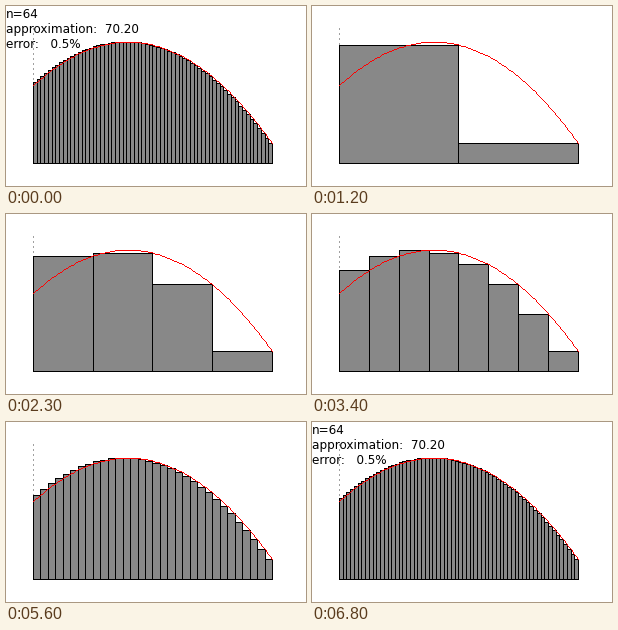
Recreate the animation shown at these times as a matplotlib script. Size 300x180 px, loop 7790 ms.

```python
import numpy as np
import matplotlib.pyplot as plt
from matplotlib.animation import FuncAnimation

W, H, DPI = 300, 180, 100
STEP, LOOP = 10, 7790             # ms
BLANK, CYCLE = 100, 1100          # ms without labels, ms per bar count
COUNTS = [2 ** k for k in range(7)]

LEFT, BASE, TOP = 27, 157, 22     # pixel positions of the plot area
SX, SY = 23.9, 13.49              # pixels per unit
SPAN = 10
A, B, C = -0.2069, 1.6402, 5.75

WHITE, BLACK, RED = (255, 255, 255), (0, 0, 0), (255, 0, 0)
BAR, AXIS = (136, 136, 136), (160, 160, 160)


def f(x):
    return A * x ** 2 + B * x + C


def px(x):
    return LEFT + int(np.ceil(x * SX - 0.5))


def py(y):
    return BASE - int(np.floor(y * SY + 0.5))


def line(img, x0, y0, x1, y1, color):
    steps = max(abs(x1 - x0), abs(y1 - y0), 1)
    t = np.arange(steps + 1) / steps
    xs = np.floor(x0 + (x1 - x0) * t + 0.5).astype(int)
    ys = np.floor(y0 + (y1 - y0) * t + 0.5).astype(int)
    img[ys, xs] = color


def bar(img, x0, x1, top):
    img[top:BASE + 1, x0:x1 + 1] = BLACK
    img[top + 1:BASE, x0 + 1:x1] = BAR


def plot(n):
    img = np.full((H, W, 3), WHITE, dtype=np.uint8)
    for y in range(TOP, BASE, 5):
        img[y:y + 2, LEFT] = AXIS
    edges = np.linspace(0, SPAN, n + 1)
    for a, b in zip(edges, edges[1:]):
        bar(img, px(a), px(b), py(f(b)))
    pts = [(px(x), py(f(x))) for x in np.linspace(0, SPAN, 100)]
    for p, q in zip(pts, pts[1:]):
        line(img, *p, *q, RED)
    return img


def labels(n):
    exact = A * SPAN ** 3 / 3 + B * SPAN ** 2 / 2 + C * SPAN
    total = f(np.linspace(0, SPAN, n + 1)[1:]).sum() * SPAN / n
    error = 100 * abs(total - exact) / exact
    return f"n={n}", f"approximation: {total:6.2f}", f"error: {error:5.1f}%"


plots = [plot(n) for n in COUNTS]
notes = [labels(n) for n in COUNTS]

fig = plt.figure(figsize=(W / DPI, H / DPI), dpi=DPI, facecolor="white")
picture = fig.figimage(plots[-1])
texts = [fig.text(0, 1 - y / H, "", family="DejaVu Sans", size=12 * 72 / DPI,
                  color="black", va="baseline") for y in (12, 27, 42)]


def draw(i):
    k, phase = divmod(i * STEP - BLANK, CYCLE)
    k %= len(COUNTS)
    picture.set_data(plots[k])
    for text, note in zip(texts, notes[k]):
        text.set_text(note if phase >= BLANK else "")
    return [picture, *texts]


anim = FuncAnimation(fig, draw, frames=LOOP // STEP, interval=STEP,
                     init_func=lambda: draw(0), repeat=True, repeat_delay=0)
plt.show()
```
